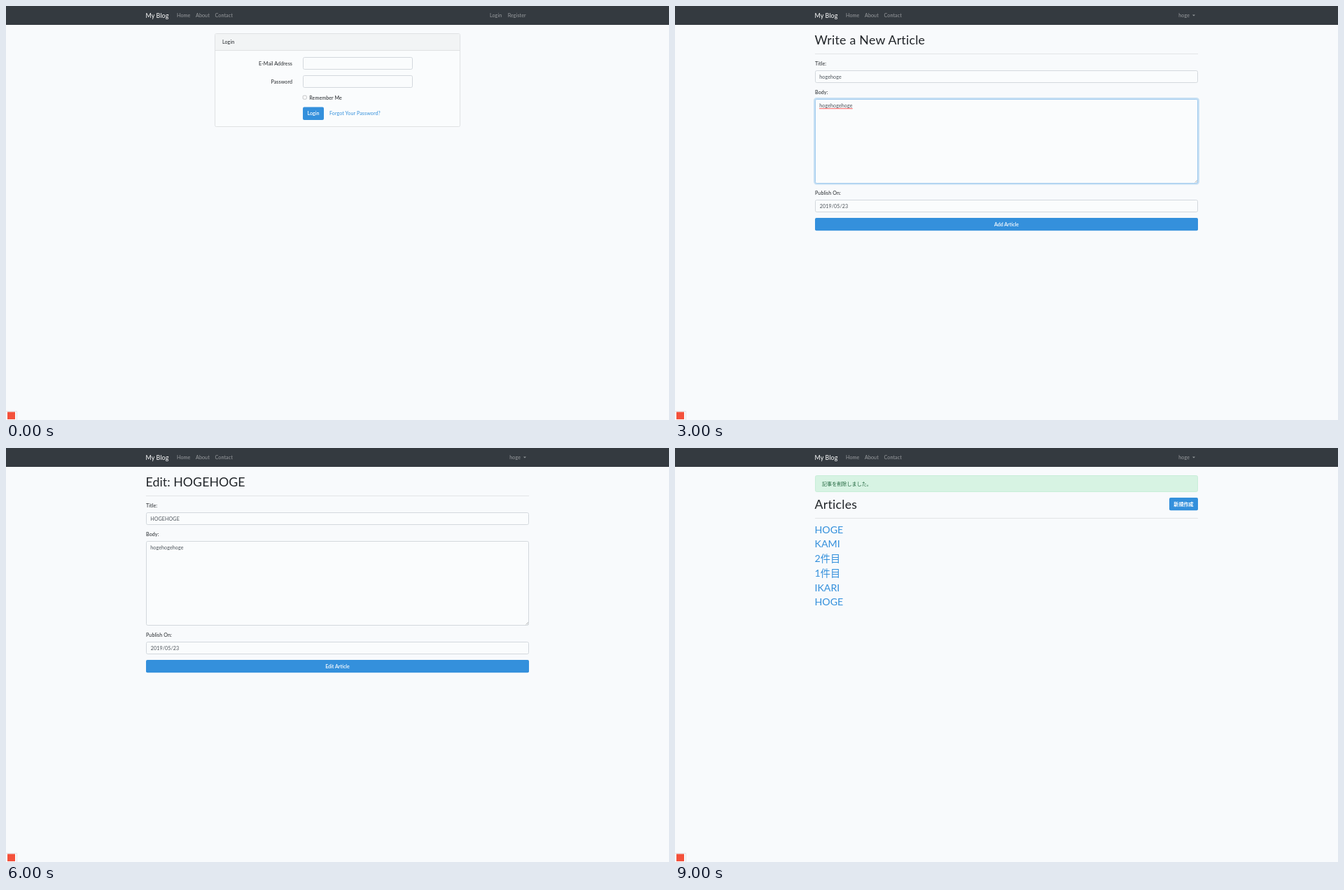
Animation of 947x592 px, one loop 10 s. Source, as an HTML page:

```html
<!DOCTYPE html>
<html>
<head>
<meta charset="utf-8">
<title>My Blog</title>
<style>
  html, body { margin: 0; width: 100%; height: 100%; overflow: hidden; background: #f8fafc; }
  svg { display: block; width: 100%; height: 100%; }
  text { font-family: Lato, "Noto Sans CJK JP", "Noto Sans CJK", sans-serif; white-space: pre; }
</style>
</head>
<body>
<svg id="stage" viewBox="0 0 947 592"></svg>
<script>
const LEFT = 200, RIGHT = 747, WIDTH = RIGHT - LEFT;
const INK = '#212529', FIELD_INK = '#495057', MUTED = '#9a9da0';
const BLUE = '#3490dc', RED = '#e3342f', GRAY = '#6c757d';
const SMALL = 7.1, H1 = 17.75, H2 = 14.2;

// Text placed by the vertical centre of its capitals.
const text = (x, middle, string, { size = SMALL, fill = INK, anchor = 'start', weight = 400, spacing = 0.014 } = {}) =>
  `<text x="${x}" y="${middle + size * 0.36}" font-size="${size}" fill="${fill}" text-anchor="${anchor}"
    font-weight="${weight}" letter-spacing="${spacing * size}">${string}</text>`;

const rect = (x, y, w, h, fill, radius = 0) =>
  `<rect x="${x}" y="${y}" width="${w}" height="${h}" rx="${radius}" fill="${fill}"/>`;

const outline = (x, y, w, h, stroke, fill = '#fafcfd', radius = 2) =>
  `<rect x="${x + 0.5}" y="${y + 0.5}" width="${w - 1}" height="${h - 1}" rx="${radius}" fill="${fill}" stroke="${stroke}"/>`;

const input = (x, y, w, value = '', textX = x + 6.3) =>
  outline(x, y, w, 18, '#d3d8dd') + text(textX, y + 9, value, { fill: FIELD_INK });

const button = (x, y, w, label, fill = BLUE) =>
  rect(x, y, w, 18.3, fill, 2) +
  text(x + w / 2, y + 9, label, { fill: '#fff', anchor: 'middle', weight: 600, spacing: 0 });

const heading = (title, top, spacing = 0.0135) =>
  text(LEFT - 0.5, top + 10, title, { size: H1, spacing }) +
  rect(LEFT, top + 29, WIDTH, 1, '#e2e4e6');

const alertBox = message =>
  outline(LEFT, 39, WIDTH, 24, '#c7eed8', '#d7f3e3') +
  text(210, 51, message, { fill: '#1d643b', weight: 500, spacing: 0 });

function navbar(user) {
  const link = (x, label) => text(x, 13.4, label, { fill: MUTED });
  const account = user
    ? link(719.3, user) + `<path d="M739 12.4h4l-2 2.1z" fill="${MUTED}"/>`
    : link(691, 'Login') + link(716.7, 'Register');
  return rect(0, 0, 947, 27, '#343a40') +
    text(199.5, 14, 'My Blog', { size: 8.87, fill: '#fff' }) +
    link(244, 'Home') + link(271, 'About') + link(298.5, 'Contact') + account;
}

const cornerBadge = outline(-1, 579, 17, 14, '#e2e4e6', '#fafcfd', 0) + rect(2, 580.5, 11, 10.5, '#f4513b');

const login = () => navbar() +
  outline(298, 39, 351, 134, '#dfe1e3') +
  rect(299, 40, 349, 23, '#f2f4f5', 1) + rect(299, 63, 349, 1, '#dfe1e3') +
  text(309, 51, 'Login') +
  text(409, 82, 'E-Mail Address', { anchor: 'end' }) + input(424, 73, 157) +
  text(409, 108, 'Password', { anchor: 'end' }) + input(424, 99, 157) +
  `<rect x="424.2" y="128.2" width="5" height="5" rx="1" fill="#fff" stroke="#a9acaf" stroke-width=".7"/>` +
  text(433.3, 131, 'Remember Me') +
  button(424, 144.6, 30, 'Login') +
  text(462, 153.6, 'Forgot Your Password?', { fill: BLUE });

function articles(titles, message) {
  const top = message ? 71 : 39;
  return navbar('hoge') + (message ? alertBox(message) : '') +
    heading('Articles', top) + button(706, top, 41, '新規作成') +
    titles.map((title, i) =>
      text(LEFT - 0.5, top + 45.5 + i * 20.75, title, { size: H2, fill: BLUE, spacing: 0 })).join('');
}

function article(title, body, message) {
  const top = message ? 71 : 39;
  return navbar('hoge') + (message ? alertBox(message) : '') +
    heading(title, top, 0) + text(LEFT, top + 43, body) +
    button(LEFT, top + 60, 27, '編集') + button(229, top + 60, 26.5, '削除', RED) +
    button(699, top + 60, 48, '一覧へ戻る', GRAY);
}

function form({ title, action, name = '', lines = [], focused, misspelt, spacing }) {
  const ring = focused
    ? `<rect x="199.2" y="132.2" width="548.6" height="122" rx="3" fill="none" stroke="${BLUE}" stroke-opacity=".25" stroke-width="2.4"/>`
    : '';
  const squiggle = misspelt
    ? '<path d="M206.3 146.6H254" stroke="#f33" stroke-width="1.2" stroke-dasharray="1.2 .7"/>'
    : '';
  return navbar('hoge') + heading(title, 39, spacing) +
    text(LEFT, 82, 'Title:') + input(LEFT, 92, WIDTH, name) +
    text(LEFT, 123.5, 'Body:') + ring +
    outline(LEFT, 133, WIDTH, 121, focused ? '#a1cbef' : '#d3d8dd') +
    lines.map((line, i) => text(206.3, 142 + i * 11.3, line, { fill: FIELD_INK })).join('') + squiggle +
    '<path d="M742.5 252.5l3.5-3.5M744.5 252.5l1.5-1.5" stroke="#8d9194" stroke-width=".6"/>' +
    text(LEFT, 267, 'Publish On:') + input(LEFT, 277, WIDTH, '2019/05/23', 206.8) +
    button(LEFT, 303, WIDTH, action);
}

const titles = ['HOGE', 'KAMI', '2件目', '1件目', 'IKARI', 'HOGE'];
const newForm = { title: 'Write a New Article', action: 'Add Article' };
const editForm = { title: 'Edit: HOGEHOGE', action: 'Edit Article', spacing: 0.003 };

// One screen per second.
const screens = [
  login(),
  articles(titles),
  form(newForm),
  form({ ...newForm, name: 'hogehoge', lines: ['hogehogehoge'], focused: true, misspelt: true }),
  articles(['HOGEHOGE', ...titles], '記事を追加しました。'),
  article('HOGEHOGE', 'hogehogehoge'),
  form({ ...editForm, name: 'HOGEHOGE', lines: ['hogehogehoge'] }),
  form({ ...editForm, name: 'HOGEHOGE_Update', lines: ['hogehogehoge', '', 'update'], misspelt: true }),
  article('HOGEHOGE_UPDATE', 'hogehogehoge update', '記事を更新しました。'),
  articles(titles, '記事を削除しました。'),
];

const stage = document.getElementById('stage');
let shown = -1;

function draw() {
  const index = Math.floor(performance.now() / 1000) % screens.length;
  if (index !== shown) {
    shown = index;
    stage.innerHTML = screens[index] + cornerBadge;
  }
  requestAnimationFrame(draw);
}
draw();
</script>
</body>
</html>
```
